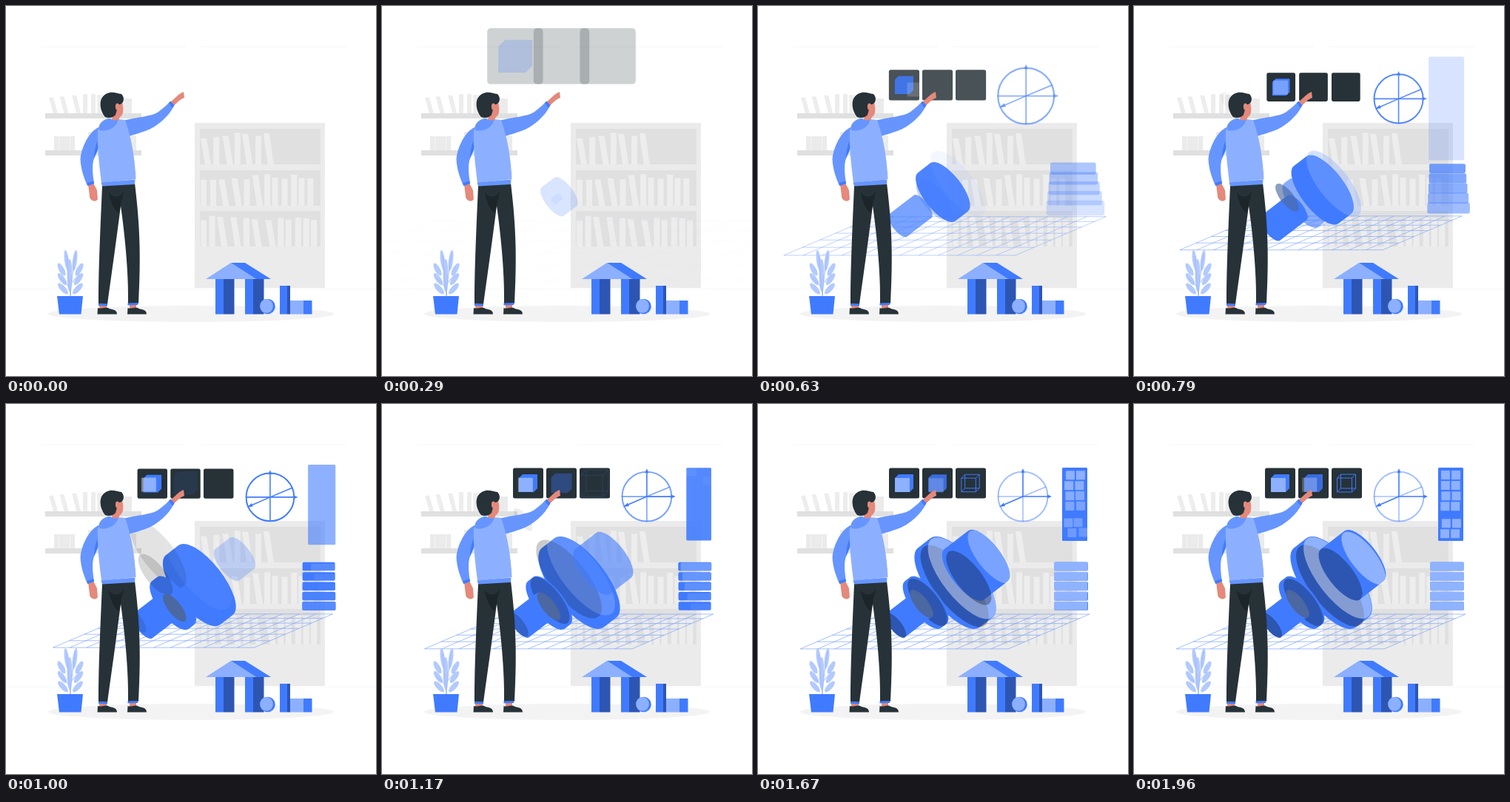
Write an HTML page with a canvas that moves like this. It is 500 px wide and 500 px high and loops after 2000 ms.

```html
<!DOCTYPE html>
<html lang="en">
<head>
<meta charset="utf-8">
<title>3D modelling</title>
<style>
html, body { margin: 0; width: 100%; height: 100%; overflow: hidden; background: #fff; }
canvas { display: block; width: 500px; height: 500px; }
</style>
</head>
<body>
<canvas id="stage" width="500" height="500"></canvas>
<script>
const c = document.getElementById('stage').getContext('2d');
const BLUE = '#407bff', LIGHT = '#8cb0ff', DEEP = '#2d56b3', SLEEVE = '#6695ff';
const INK = '#263238', SKIN = '#e4897b', WALL = '#ebebeb', SHELF = '#e0e0e0';
const TILT = 52 * Math.PI / 180, SLOPE = -.77, FLIGHT = 930;
let t = 0;

const clamp = u => Math.min(1, Math.max(0, u));
const backOut = u => 1 + 2 * (u - 1) ** 3 + (u - 1) ** 2;

function layer(alpha, draw) {
  if (alpha <= 0) return;
  c.save();
  c.globalAlpha *= alpha;
  draw();
  c.restore();
}

// Fades in and settles at x, y, coming from an offset and a larger or smaller size
function fly(start, x, y, dx, dy, grow, draw) {
  const u = clamp((t - start) / FLIGHT), rest = 1 - backOut(u);
  layer(clamp(u * 1.7), () => {
    c.translate(x + dx * rest, y + dy * rest);
    c.scale(1 + grow * rest, 1 + grow * rest);
    draw();
  });
}

function shape(d, fill) {
  c.fillStyle = fill;
  c.fill(new Path2D(d));
}

function line(d, color, width) {
  c.strokeStyle = color;
  c.lineWidth = width;
  c.stroke(new Path2D(d));
}

function box(x, y, w, h, fill, r = 0) {
  c.beginPath();
  c.roundRect(x, y, w, h, r);
  c.fillStyle = fill;
  c.fill();
}

function oval(x, y, a, b, fill, angle = TILT) {
  c.beginPath();
  c.ellipse(x, y, a, b, angle, 0, 7);
  c.fillStyle = fill;
  c.fill();
}

function tube(a, length) {
  c.beginPath();
  c.ellipse(0, 0, a, a * .385, TILT, 0, Math.PI);
  c.ellipse(length, length * SLOPE, a, a * .385, TILT, Math.PI, 2 * Math.PI);
  c.closePath();
  c.fillStyle = BLUE;
  c.fill();
}

const sheet = (a, alpha, fill) => layer(alpha, () => oval(0, 0, a, a * .385, fill));

function books(from, to, base, width, height, seed) {
  const random = () => (seed = seed * 16807 % 2147483647) / 2147483647;
  for (let x = from; x < to - width;) {
    const h = height * (.82 + .18 * random());
    const lean = random() < .3 ? -6 : 0;
    shape(`M${x - lean} ${base}l${lean} ${-h}h${width}l${-lean} ${h}z`, '#ededed');
    x += width + 2 - lean + 3 * random();
  }
}

function room() {
  line('M48 55H243M264 55H460', '#f5f5f5', 1);
  line('M0 382.5H500', '#f8f8f8', 1);
  oval(250, 416, 193, 11, '#f3f3f3', 0);

  for (const y of [145, 195]) box(53, y, 130, 7, SHELF);
  books(58, 134, 145, 6, 26, 77);
  box(150, 125, 20, 20, WALL);
  box(65, 176, 28, 19, WALL);
  line('M71.5 176V195M86.5 176V195', '#f5f5f5', 1);
  box(111, 170, 9, 25, WALL);
  box(168, 175, 8, 20, WALL);

  box(255, 158, 176, 223, WALL);
  [214, 270, 325].forEach((base, i) => {
    box(262, base - 48, 163, 48, SHELF);
    books(263, i ? 425 : 374, base, 8, 43, 31 + i * 501);
  });
}

function grid() {
  fly(280, 252.5, 307.5, 0, 35, 1.2, () => {
    let d = '';
    for (let i = 0; i <= 6; i++) {
      const v = -23.5 + 5.6 * i + .37 * i * i;
      d += `M${-140.5 - v * 2.34} ${v}h281`;
    }
    for (let i = 0; i <= 12; i++)
      d += `M${-195.5 + i * 281 / 12} 23.5l110-47`;
    line(d, '#7da3fb', .7);
  });
}

function wheel() {
  const pale = 1 - .52 * clamp((t - 1000) / 300);
  fly(300, 358, 125, 35, -29, 1.1, () => {
    layer(pale, () => {
      c.beginPath();
      c.arc(0, 0, 33.5, 0, 7);
      c.strokeStyle = BLUE;
      c.lineWidth = 2;
      c.stroke();
      line('M0 0V34M0 0H-34M0 0L31 -13', BLUE, 1.6);
    });
    line('M0 0V-34M0 0H34M0 0L-30 13', BLUE, 1.6);
    shape('M-2.5 -32L0 -38L2.5 -32zM33 -2.5L39 0L33 2.5zM-26 8.5L-32 14L-24 13z', BLUE);
  });
}

const HEX = 'M-12.5 -7l5 -5h20v19l-5 5h-20z';

function panels() {
  const front = (start, x, alpha) => fly(start, x, 107, 58, 12, 0,
    () => layer(alpha, () => box(-12.5, -7, 20, 19, '#fff')));

  [-45, 0, 45].forEach(dx => fly(170, 242.5 + dx, 107, dx * .7, -70, 1.5,
    () => box(-20.5, -20.5, 41, 41, INK, 2.5)));
  fly(170, 197.5, 107, -31, -70, 1.5, () => shape(HEX, BLUE));
  front(400, 197.5, .4);
  fly(940, 242.5, 107, 0, 0, .4, () => shape(HEX, '#3a6cdd'));
  front(1250, 241.5, .25);
  fly(1100, 287, 107, 0, 0, .7, () =>
    line(HEX + 'M-12.5 -7h20v19M7.5 -7l5 -5M-7.5 -12v19h20M-7.5 7l-5 5', BLUE, 1));
}

function column() {
  fly(680, 428, 135.5, -10, 5, .7, () => {
    box(-17, -49.5, 34, 99, BLUE, 1.5);
    c.clip();
    for (let i = 0; i < 12; i++) {
      const col = i % 2, row = i >> 1;
      const x = -7 + col * 14, y = -39.5 + row * 14 + (row > 3 ? 9 : 0);
      fly(1050 + i * 30, x, y, row % 2 ? 25 : -25, -8, 0,
        () => layer(.4, () => box(-6, -6, 12, 12, '#fff', 1)));
    }
  });
}

function bars() {
  for (let i = 0; i < 5; i++)
    fly(400 + i * 30, 423, 219.6 + i * 13.35, 10, 0, 1.2, () => {
      box(-23, -6, 46, 12, BLUE, 2);
      c.clip();
      fly(850 + i * 60, 0, 0, 25, 4, 0, () => layer(.42, () => box(-23, -6, 46, 12, '#fff', 2)));
    });
}

function part() {
  // Large disc grows steadily until its faces land on it
  const grown = clamp((t - 200) / 970), size = 20 + 48 * grown;
  layer(clamp(grown * 2.1), () => {
    c.translate(228 + 30 * grown, 266 - 18 * grown);
    tube(size, 17);
  });
  layer(Math.sin(Math.PI * clamp((t - 600) / 380)), () => {
    c.translate(270, 240);
    sheet(54, .38, LIGHT);
  });
  fly(800, 265, 245.5, -170, -122, -.5, () => sheet(67, .3, '#000'));
  fly(950, 275, 235, -20, -15, 0, () => sheet(67, .41, '#fff'));

  // Upper cylinder
  fly(850, 279, 230, 42, -27, -.8, () => tube(43, 32));
  fly(1050, 279, 230, -158, -132, -1, () => sheet(43, .3, '#000'));
  fly(1270, 311.5, 207.5, 40, -25, 0, () => sheet(43.5, .41, '#fff'));

  // Lower flange and stem
  fly(450, 223, 271, 30, -20, -.6, () => tube(40, 7));
  fly(730, 229, 268, -129, -178, -.6, () => sheet(39, .3, '#000'));
  fly(250, 186, 299, 55, -42, -.9, () => tube(20.5, 35));
  fly(800, 186, 299, -30, -20, 0, () => sheet(20.5, .3, '#000'));
  fly(420, 221, 270, -194, -153, 0, () => sheet(23, .95, '#4d689f'));
}

function blocks() {
  for (const x of [283, 323]) {
    box(x, 369, 11, 47.5, BLUE);
    box(x + 11, 369, 14.5, 47.5, DEEP);
  }
  shape('M270 369L304 347L338 369z', LIGHT);
  shape('M304 347H323L358 369H338z', BLUE);
  box(370, 378, 10, 38.5, BLUE);
  box(380, 378, 4, 38.5, DEEP);
  box(384, 398, 18, 18.5, LIGHT);
  box(402, 398, 11.5, 18.5, BLUE);
  oval(353.5, 406, 10.3, 10.3, BLUE, 0);
  oval(352, 405.5, 8.8, 9.5, LIGHT, 0);
}

function plant() {
  for (const side of [-1, 1]) {
    oval(87.5 + side * 5.5, 344, 3, 14, '#b3caff', side * .13);
    for (let i = 0; i < 3; i++)
      oval(87 + side * (12 - i), 356 + i * 13, 3.6, 9.5, '#b3caff', side * (.5 + i * .12));
  }
  oval(86, 364, 3.5, 22, '#b3caff', 0);
  line('M87 392C85 372 84 355 82 338M87 392C88 372 91 355 94 334M86 380L74 368M88 375L99 362', '#9dbbff', 1);
  shape('M69 392H104L101.5 416.5H72z', BLUE);
}

function person() {
  shape('M111 241L118 239L123 249L124 261C121 266 113 263 113 257z', SKIN);
  shape('M126 402h10v7h-10zM167 402h9v7h-9z', SKIN);
  shape('M130 243L174 239C180 290 183 330 179 402L165 403C166 360 160 305 155 270C150 310 143 360 137 403L125 402C125 350 128 290 130 243z', INK);
  shape('M139 252C141 264 145 274 152 280L155 270C156 262 158 256 160 249C155 258 148 262 139 252z', '#1c2529');
  shape('M125 402L137 402.5V405.5L125 405zM164.5 401.5L178.5 401L178 404L164.5 404.5z', BLUE);
  shape('M123.5 416.5L124 408C129 410 134 406 138 408C142 411 150 409 150 416.5z', INK);
  shape('M164 416.5L164.5 408C169 410 174 406 178 408C182 411 190 409 190 416.5z', INK);

  shape('M127 163C113 168 102 190 100.5 207C101 222 107 236 110 243L119 240C117 226 116 214 119 206C123 197 126 190 127 180z', SLEEVE);
  shape('M109.5 239L118.5 236.5L119 240L110.5 243z', BLUE);
  shape('M125 180C121 187 119 196 119 206C122 199 124 194 126 190z', BLUE);
  shape('M221 131C228 125 234 118 240 116L241 124C236 126 232 129 226 136z', SKIN);
  shape('M158 155C178 150 198 149 206 143C214 137 219 132 222 129L227 135C220 149 205 163 188 169C180 172 172 174 166 176z', SLEEVE);
  shape('M220 131L222.5 128.5L227.5 134L225 137.5z', BLUE);
  shape('M124 168C130 157 148 151 161 154C170 180 174 205 175.5 234L129 239C126 215 123 190 124 168z', LIGHT);
  shape('M128.5 238.5L174.5 234.5L174 241L130 243.5z', SLEEVE);

  shape('M144 142L155 146L152 155L143 155z', SKIN);
  shape('M126 166C124 157 136 151 141 152C145 155 149 155 151 153C152 162 138 171 126 168z', SLEEVE);
  shape('M146 132L157 130C159 138 159 146 155 149.5C151 152 147 149 145 145z', SKIN);
  shape('M134 150C126 140 124 123 137 118C143 115 151 118 156 119C162 125 158 134 152 133L148 147C145 151 139 152 134 150z', INK);
  oval(150.5, 136, 2.6, 4.5, SKIN, 0);
}

const scene = [room, grid, wheel, panels, column, bars, part, blocks, plant, person];
const begin = performance.now();

function show() {
  t = (performance.now() - begin) % 2000;
  c.clearRect(0, 0, 500, 500);
  for (const draw of scene) draw();
  requestAnimationFrame(show);
}
show();
</script>
</body>
</html>
```
